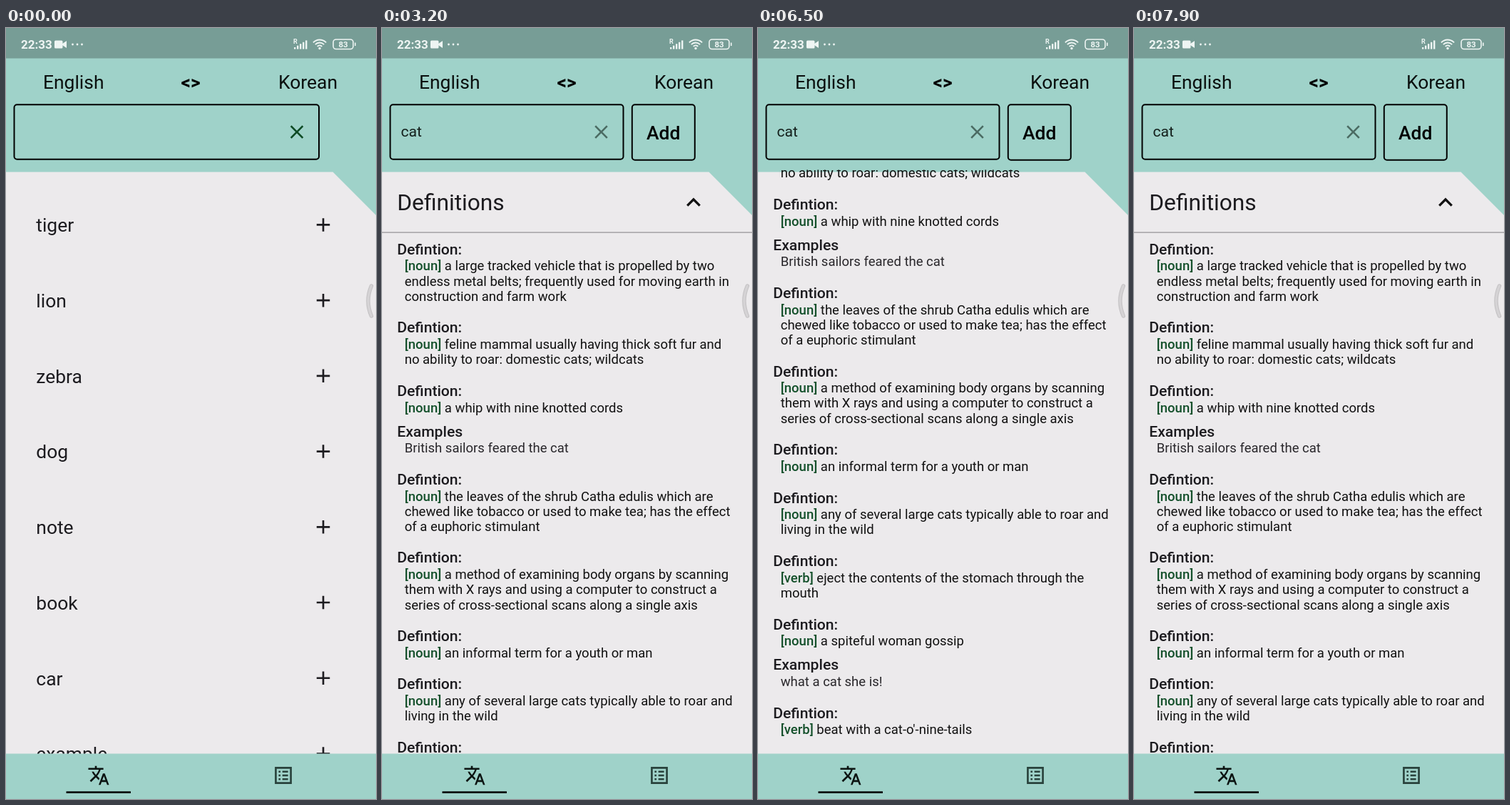
An HTML page with a canvas for the animation above (8 s loop, 519x1079 px).

```html
<!DOCTYPE html>
<html lang="en">
<head>
<meta charset="utf-8">
<title>Dictionary app</title>
<style>
html, body { margin: 0; width: 100%; height: 100%; overflow: hidden; background: #9fd2c9; }
canvas { display: block; }
</style>
</head>
<body>
<canvas id="stage" width="519" height="1079"></canvas>
<script>
const ctx = document.getElementById('stage').getContext('2d');
const LOOP = 8000, STEP = 100, DP = 1.3216;
const TEAL = '#9fd2c9', PANEL = '#eceaec', INK = '#1c1b1f', GREEN = '#14502b', WHITE = '#eef5f3';

const ICONS = {
  plus: 'M19 13H13V19H11V13H5V11H11V5H13V11H19Z',
  close: 'M19 6.41L17.59 5L12 10.59L6.41 5L5 6.41L10.59 12L5 17.59L6.41 19L12 13.41L17.59 19L19 17.59L13.41 12Z',
  up: 'M7.41 15.41L12 10.83L16.59 15.41L18 14L12 8L6 14Z',
  translate: 'M12.87 15.07L10.33 12.56L10.36 12.53C12.1 10.59 13.34 8.36 14.07 6H17V4H10V2H8V4H1V6H12.17C11.5 7.92 10.44 9.75 9 11.35C8.07 10.32 7.3 9.19 6.69 8H4.69C5.42 9.63 6.42 11.17 7.67 12.56L2.58 17.58L4 19L9 14L12.11 17.11ZM18.5 10H16.5L12 22H14L15.12 19H19.87L21 22H23ZM15.88 17L17.5 12.67L19.12 17Z',
  list: 'M3 3H21V21H3ZM5 5V19H19V5ZM7 7H9V9H7ZM11 7H17V9H11ZM7 11H9V13H7ZM11 11H17V13H11ZM7 15H9V17H7ZM11 15H17V17H11Z',
  mic: 'M12 2A3 3 0 0 1 15 5V11A3 3 0 0 1 9 11V5A3 3 0 0 1 12 2M19 11C19 14.53 16.39 17.44 13 17.93V21H11V17.93C7.61 17.44 5 14.53 5 11H7A5 5 0 0 0 17 11Z'
};
for (const name in ICONS) ICONS[name] = new Path2D(ICONS[name]);

const WORDS = ['tiger', 'lion', 'zebra', 'dog', 'note', 'book', 'car', 'example'];
const DEFINITIONS = [
  ['noun', 'a large tracked vehicle that is propelled by two|endless metal belts; frequently used for moving earth in|construction and farm work'],
  ['noun', 'feline mammal usually having thick soft fur and|no ability to roar: domestic cats; wildcats'],
  ['noun', 'a whip with nine knotted cords', 'British sailors feared the cat'],
  ['noun', 'the leaves of the shrub Catha edulis which are|chewed like tobacco or used to make tea; has the effect|of a euphoric stimulant'],
  ['noun', 'a method of examining body organs by scanning|them with X rays and using a computer to construct a|series of cross-sectional scans along a single axis'],
  ['noun', 'an informal term for a youth or man'],
  ['noun', 'any of several large cats typically able to roar and|living in the wild'],
  ['verb', 'eject the contents of the stomach through the|mouth'],
  ['noun', 'a spiteful woman gossip', 'what a cat she is!'],
  ['verb', "beat with a cat-o'-nine-tails"]
];
const TRANSLATIONS = ['고양이', '묘', '수고양이', '암고양이'];

function text(str, x, y, size, color = INK, weight = 400, align = 'left') {
  ctx.font = `${weight} ${size}px Roboto, "Noto Sans CJK KR", sans-serif`;
  ctx.fillStyle = color;
  ctx.textAlign = align;
  ctx.fillText(str, x, y);
  return ctx.measureText(str).width;
}
function rect(x, y, w, h, color) {
  ctx.fillStyle = color;
  ctx.fillRect(x, y, w, h);
}
function box(x, y, w, h, r, color, lineWidth) {
  ctx.beginPath();
  ctx.roundRect(x, y, w, h, r);
  paint(color, lineWidth);
}
function circle(x, y, r, color, lineWidth) {
  ctx.beginPath();
  ctx.arc(x, y, r, 0, 7);
  paint(color, lineWidth);
}
function paint(color, lineWidth) {
  ctx.fillStyle = ctx.strokeStyle = color;
  ctx.lineWidth = lineWidth;
  lineWidth ? ctx.stroke() : ctx.fill();
}
function line(d, color, lineWidth) {
  ctx.strokeStyle = color;
  ctx.lineWidth = lineWidth;
  ctx.stroke(new Path2D(d));
}
function icon(name, x, y, color, scale = DP) {
  ctx.save();
  ctx.translate(x, y);
  ctx.scale(scale, scale);
  ctx.translate(-12, -12);
  ctx.fillStyle = color;
  ctx.fill(ICONS[name], 'evenodd');
  ctx.restore();
}
function clipped(y, h, draw) {
  ctx.save();
  ctx.beginPath();
  ctx.rect(0, y, 519, h);
  ctx.clip();
  draw();
  ctx.restore();
}

const clamp = v => Math.min(1, Math.max(0, v));
const progress = (t, from, to) => clamp((t - from) / (to - from));
const easeOut = p => 1 - (1 - p) ** 2;
const easeInOut = p => p * p * (3 - 2 * p);

function scrollAt(t) {
  return 88.5 * easeOut(progress(t, 4600, 4900))
    + 413.5 * easeInOut(progress(t, 6100, 7000))
    - 502 * easeInOut(progress(t, 7000, 7800));
}

function statusBar(typing) {
  rect(0, 0, 519, 42.5, '#779d96');
  text('22:33', 21, 29, 17, WHITE, 700);
  if (typing) {
    box(70, 19, 14, 7.5, 1, WHITE);
    for (let i = 0; i < 8; i++) rect(71.5 + (i % 4) * 3, 20.5 + (i >> 2) * 2, 1.3, 1, '#779d96');
    rect(73, 24.6, 8, 1, '#779d96');
  } else {
    box(68, 17.5, 11.5, 11, 1.5, WHITE);
    ctx.fill(new Path2D('M79 22L85 18V28L79 24Z'));
  }
  for (const x of [93.5, 100, 106.5]) circle(x, 23, 1.4, WHITE);
  text('R', 403, 21.5, 9, WHITE, 700);
  for (let i = 0; i < 5; i++) rect(404 + i * 4, 27 - i * 2.4, 2.4, 2.5 + i * 2.4, WHITE);
  for (const r of [4.5, 8.5, 12.5]) {
    ctx.beginPath();
    ctx.arc(440, 29, r, -Math.PI * .76, -Math.PI * .24);
    paint(WHITE, 1.8);
  }
  circle(440, 28.5, 1.7, WHITE);
  box(459, 16, 28, 13.5, 4, WHITE, 1.6);
  rect(489, 20.5, 1.6, 4.5, WHITE);
  text('83', 473, 27, 11.5, WHITE, 700, 'center');
}

function header(query, found, focused) {
  text('English', 52, 84.5, 20 * DP, '#0a0f0e');
  text('<>', 259, 84.5, 20 * DP, '#000', 700, 'center');
  text('Korean', 382, 84.5, 20 * DP, '#0a0f0e');
  box(11.5, 107.2, found ? 327 : 427.5, 76.5, 4, '#000', 2);
  icon('close', found ? 307.5 : 408, 145.5, found ? '#4b6b63' : '#0d4a24');
  const w = text(query, 26.5, 151.5, 16 * DP, '#14201c');
  if (focused) {
    if (query) rect(26.5, 153.5, w, 1.4, '#14201c');
    rect(query ? 26.5 + w : 26.8, query ? 132 : 134, 2.4, query ? 24 : 20, '#0d4a24');
  }
  if (found) {
    box(350.8, 107.2, 88, 77.5, 4, '#000', 2);
    text('Add', 394.7, 155.5, 20 * DP, '#000', 500, 'center');
  }
}

function wordList() {
  WORDS.forEach((word, i) => {
    const y = i * 80 * DP;
    text(word, 42.3, 285.3 + y, 20 * DP);
    icon('plus', 445, 275.4 + y, INK);
  });
}

function section(title, y) {
  text(title, 21.3, y + 11, 24 * DP);
  icon('up', 437, y + .7, '#111', 1.65);
  rect(0, y + 42, 519, 1.2, '#929093');
}

function results() {
  section('Definitions', 243.5);
  const body = 14 * DP, head = 16 * DP, pitch = 21.15;
  let y = 316.6;
  for (const [kind, definition, example] of DEFINITIONS) {
    const lines = definition.split('|');
    text('Defintion:', 21.2, y, head, INK, 500);
    const w = text(`[${kind}]`, 31.7, y + 22.8, body, GREEN, 500);
    lines.forEach((str, i) => text(i ? str : ' ' + str, i ? 31.7 : 31.7 + w, y + 22.8 + i * pitch, body, '#111'));
    y += 46.2 + lines.length * pitch;
    if (example) {
      text('Examples', 21.2, y - 10.5, head, INK, 500);
      text(example, 31.7, y + 12.2, body, '#29272b');
      y += 56.7;
    }
  }
  section('Translation', 1305.6);
  TRANSLATIONS.forEach((str, i) => text(str, 21.2, 1380 + i * 47.6, body));
}

function panel(bottom) {
  ctx.beginPath();
  for (const [x, y] of [[0, 201.5], [458.5, 201.5], [519, 262], [519, bottom], [0, bottom]]) ctx.lineTo(x, y);
  paint(PANEL);
}

function edgeHandle() {
  ctx.lineCap = 'round';
  line('M512.5 361Q503.5 382 512.5 403', '#c3c1c3', 5.5);
  line('M512.5 361Q503.5 382 512.5 403', '#d5d3d5', 3.5);
  ctx.lineCap = 'butt';
}

function navBar() {
  rect(0, 1016, 519, 63, TEAL);
  rect(0, 1015.5, 519, 1, '#a6d4cc');
  icon('translate', 130, 1046, '#0c1412');
  icon('list', 389, 1046, '#29423c');
  rect(84.5, 1068.3, 90.5, 2.6, '#000');
}

function keyboard(suggestions) {
  const key = '#424045', soft = '#6d6b70';
  rect(0, 748, 519, 331, '#ebe9eb');
  rect(0, 748, 519, 60, '#e1dfe1');
  circle(31, 780, 20.5, '#cfcdcf');
  circle(31, 779, 19.5, '#fcfcfc');
  circle(31, 779, 12.5, '#4285f4');
  rect(183, 763, 1, 32, '#c5c3c6');
  rect(333, 763, 1, 32, '#c5c3c6');
  suggestions.forEach((str, i) => text(str, 116 + i * 142, 788.5, 24, '#49474c', 400, 'center'));
  icon('mic', 493, 779.5, soft, 1.24);

  [['qwertyuiop', 28.5, 851.5], ['asdfghjkl', 54, 917.5], ['zxcvbnm', 105, 984.5]].forEach(([row, x0, y], r) => {
    [...row].forEach((letter, i) => {
      const x = x0 + i * 51.2;
      text(letter, x, y, 30, key, 400, 'center');
      if (!r) text((i + 1) % 10, x + 15.5, 831, 13, '#89878c', 500, 'center');
    });
  });
  line('M41 986V967M31.5 976L41 966.5L50.5 976', soft, 2.4);
  line('M470 965.5H491.5V986H470L463 975.7ZM475 971L484.5 980.5M484.5 971L475 980.5', soft, 2);

  text('?123', 20, 1048.5, 20, soft, 500);
  circle(105, 1031, 6.6, soft, 1.5);
  circle(102.6, 1029.3, 1, soft);
  circle(107.4, 1029.3, 1, soft);
  line('M101.3 1032.5Q105 1037 108.7 1032.5', soft, 1.4);
  text(',', 105, 1050, 25, key, 400, 'center');
  box(143.5, 1026, 231.5, 30.5, 4, '#cfcdd0');
  text('EN • HU • SK', 259, 1048, 18, '#918f94', 400, 'center');
  text('.', 413, 1050, 25, key, 400, 'center');
  line('M467 1042L474 1049.5L488.5 1034', '#2d95e5', 2.7);
}

function typed(t) {
  if (t < 1800) return ['', []];
  if (t < 2000) return ['c', ['c', 'C', 'can']];
  if (t < 2200) return ['ca', ['ca', 'CA', 'can']];
  return ['cat', t < 2400 ? ['ca', 'CA', 'can'] : ['cat', 'Cat', 'cats']];
}

function draw(t) {
  const found = t >= 3100;
  const [query, suggestions] = typed(t);
  const shown = easeOut(progress(t, 1100, 1400)) - easeOut(progress(t, 2700, 3100));
  const bottom = t >= 1100 && t < 2800 ? 750 : 1016;

  rect(0, 0, 519, 1079, TEAL);
  statusBar(t >= 1400 && t < 3100);
  header(query, found, t >= 1000 && t < 2800);
  panel(bottom);
  clipped(198.5, bottom - 198.5, () => {
    if (!found) return wordList();
    ctx.translate(0, -scrollAt(t));
    results();
  });
  edgeHandle();
  navBar();
  if (shown > 0) {
    ctx.save();
    ctx.translate(0, 331 * (1 - shown));
    keyboard(suggestions);
    ctx.restore();
  }
}

function tick() {
  const t = performance.now() % LOOP;
  draw(Math.floor(t / STEP) * STEP);
  requestAnimationFrame(tick);
}
tick();
</script>
</body>
</html>
```
